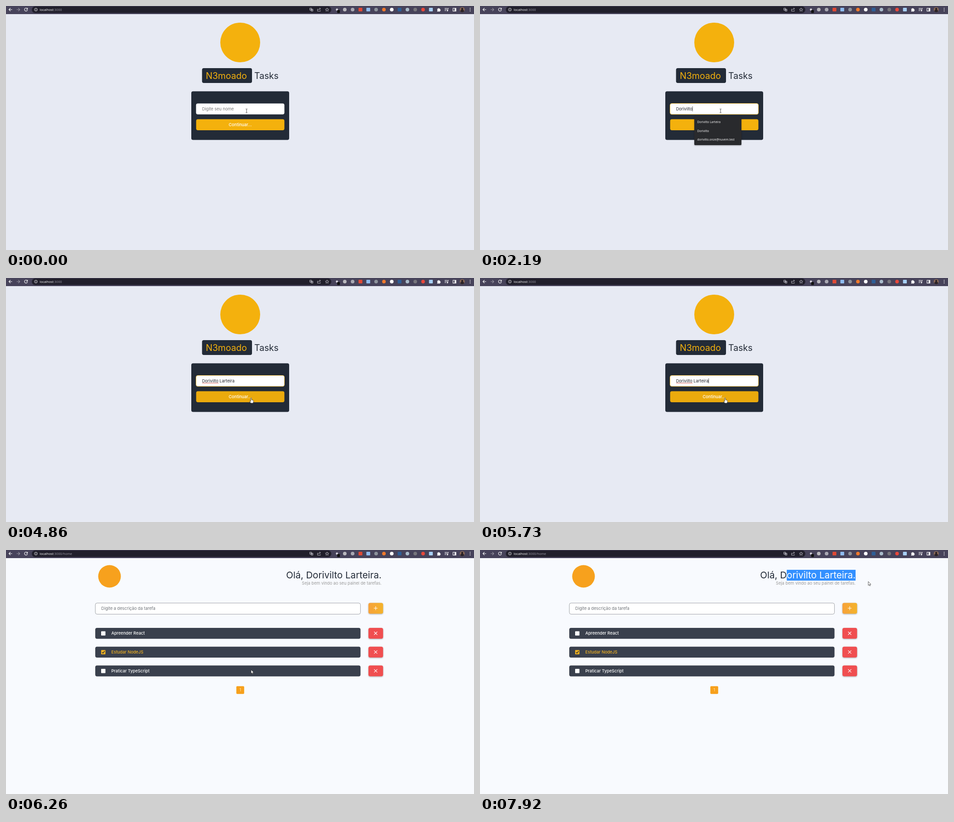
An HTML page that plays this animation: 1033x542 px, repeating every 7.99 s.

```html
<!DOCTYPE html>
<html lang="pt-BR">
<head>
<meta charset="utf-8">
<title>Tasks</title>
<style>
  html, body { margin: 0; width: 100%; height: 100%; overflow: hidden; background: #e7eaf3; }
  svg { display: block; width: 100vw; height: 100vh; }
  text { font: 9.2px Inter, sans-serif; white-space: pre; }
  .title { font-size: 19.6px; }
  .hello { font-size: 20.6px; text-anchor: end; }
  .medium { font-weight: 500; }
  .ui { font: 6.6px "Open Sans", sans-serif; fill: #fff; }
  .url { font-size: 7.3px; }
  .line { fill: none; stroke: #fff; stroke-width: 1.1; }
  .raised { filter: drop-shadow(0 1px 1.5px #0005); }
</style>
</head>
<body>
<svg viewBox="0 0 1033 542">
  <defs>
    <linearGradient id="amber"><stop stop-color="#f7a23a"/><stop offset="1" stop-color="#f4b32b"/></linearGradient>
    <clipPath id="selected"><rect id="clip" y="44" height="24"/></clipPath>
  </defs>

  <g id="login">
    <rect width="1033" height="542" fill="#e7eaf3"/>
    <circle cx="517" cy="81" r="44" fill="#f4b10d"/>
    <rect x="432.7" y="138" width="110.3" height="33" rx="4" fill="#232b37"/>
    <text class="title" x="441" y="161.5" fill="#f4b10d">N3moado</text>
    <text class="title" x="548" y="161.5" fill="#232b37">Tasks</text>
    <rect x="409" y="189.5" width="216" height="108" rx="4" fill="#232b37"/>
    <rect id="field" x="419.5" y="216.5" width="195" height="24.2" rx="4" fill="#fff"/>
    <text id="hint" x="432.7" y="231.8" fill="#777">Digite seu nome</text>
    <text id="typed" x="432.7" y="231.8" fill="#20242c"></text>
    <line id="spell" x1="433" y1="233.5" y2="233.5" stroke="#d9483f" stroke-width=".8"/>
    <line id="caret" y1="223" y2="234" stroke="#222" stroke-width=".8"/>
    <rect id="button" x="419.7" y="251.5" width="194.8" height="24.5" rx="4"/>
    <text class="medium" x="517" y="266.8" fill="#fff" text-anchor="middle">Continuar...</text>
    <g id="popup" class="raised">
      <rect id="panel" x="473" y="246" rx="2" fill="#292a2d"/>
      <g id="options"></g>
    </g>
  </g>

  <g id="home">
    <rect width="1033" height="542" fill="#f8fafe"/>
    <text id="hello" class="hello" x="829" y="63" fill="#232b37"></text>
    <rect id="mark" y="44" height="24" fill="#3390ff"/>
    <text id="helloOn" class="hello" x="829" y="63" fill="#fff" clip-path="url(#selected)"></text>
    <text x="829" y="77.3" fill="#999" text-anchor="end">Seja bem vindo ao seu painel de tarefas.</text>
    <rect x="197.2" y="117.8" width="585.2" height="24.8" rx="4" fill="#fff" stroke="#868990" stroke-width=".8"/>
    <text x="210.3" y="133.2" fill="#6f7378">Digite a descrição da tarefa</text>
    <rect class="raised" x="800" y="117.5" width="32.3" height="24" rx="4" fill="url(#amber)"/>
    <path class="line" d="M811.8 129.3h8.4M816 125.1v8.4"/>
    <circle id="logo" cx="228.5" cy="58.5" r="25" fill="#f7a11d"/>
    <g id="tasks"></g>
    <g id="pager">
      <rect x="508.4" y="177.6" width="17.3" height="17.2" rx="2" fill="#f7a01b"/>
      <text x="517" y="189.4" fill="#ffe3b4" text-anchor="middle">1</text>
    </g>
  </g>

  <g id="browser">
    <rect width="1033" height="18" fill="#47435a"/>
    <rect x="57" y="1" width="661" height="14.5" rx="7.2" fill="#211f2b"/>
    <path class="line" d="M13.5 8h-7M9.8 4.7L6.5 8l3.3 3.3"/>
    <path class="line" stroke-opacity=".45" d="M23.5 8h7M27.2 4.7L30.5 8l-3.3 3.3"/>
    <path class="line" d="M46.6 5.6A3.4 3.4 0 1 0 47.4 9M47.5 4.3v2.8h-2.8"/>
    <circle class="line" cx="66" cy="8" r="3.2" style="stroke-width:.8"/>
    <path class="line" style="stroke-width:.8" d="M66 7.5v2.2M66 6v.8"/>
    <text class="ui url" x="74.3" y="10.6">localhost<tspan id="path" fill="#9a98a3"></tspan></text>
    <g class="line" style="stroke:#d5d3dc;stroke-width:.8">
      <path d="M670.5 4.8h4v4.5h-4zM673.5 7h4v4.5h-4zM671.5 7h2M674.8 10l.8-2 .8 2"/>
      <path d="M689 7h-1.5v4.5h6.5v-2M689.5 9q.4-3 4-3M692 4l2.5 2-2.5 2"/>
      <path d="M708.7 4.4l1.1 2.5 2.7.2-2 1.8.6 2.7-2.4-1.4-2.4 1.4.6-2.7-2-1.8 2.7-.2z"/>
    </g>
    <g id="addons"></g>
    <path d="M951.8 6h2a1.3 1.3 0 0 1 2.6 0h1.8v2a1.3 1.3 0 0 1 0 2.6v1.6h-6.4v-2a1.3 1.3 0 0 0 0-2.4z" fill="#fff"/>
    <path class="line" d="M968.3 5.3h5.5M968.3 7.8h5.5M968.3 10.3h3M975.2 10.5V5.3h2"/>
    <circle cx="974.3" cy="10.4" r="1.3" fill="#fff"/>
    <path class="line" d="M986.6 5h6.6v6.4h-6.6z"/>
    <path d="M990.2 5h3v6.4h-3z" fill="#fff"/>
    <circle cx="1007" cy="8" r="5.6" fill="#8a6a58"/>
    <path d="M1003 12a4 4 0 0 1 8 0a5.6 5.6 0 0 1-8 0" fill="#2a2226"/>
    <circle cx="1007" cy="6.3" r="2.2" fill="#2a2226"/>
    <path d="M1024.5 4.2v1.5M1024.5 7.3v1.5M1024.5 10.4v1.5" stroke="#fff" stroke-width="1.5"/>
  </g>

  <g id="mouse">
    <circle id="press" r="6" fill="#f3e92a" fill-opacity=".9"/>
    <path id="beam" d="M-2-4.2h1.4L0-3.6.6-4.2H2M0-3.6v7.2M-2 4.2h1.4L0 3.6.6 4.2H2" fill="none" stroke="#222" stroke-width=".8"/>
    <path id="arrow" d="M0 0v8.6l2-1.8 1.3 3 1.3-.6-1.3-2.9h2.6z" fill="#fff" stroke="#222" stroke-width=".7"/>
    <path id="hand" d="M-.9 1.3a.9.9 0 0 1 1.9 0v3.4l3.4.8q1.2.4 1.1 1.6l-.5 2.8-.7 2.1H-.6L-2.9 8.8q-.9-1.4.3-1.5L-.9 8.4z" fill="#fff" stroke="#222" stroke-width=".7"/>
  </g>
</svg>

<script>
const LOOP = 7990, STEP = 69;
const FOCUS = 70, CLICK = 5600, HOME = 5790, LOADED = 5930, DRAG = 7160;
const NAME = "Dorivilto Larteira", FIRST = 9;
const KEYS = [1070, 1270, 1470, 1590, 1710, 1830, 1950, 2070, 2190,
              2460, 2990, 3250, 3450, 3580, 3710, 3840, 4100, 4240];
const SAVED = [NAME, "Dorivilto", "dorivilto.onze@nuvem.test", "Dono", "Teste", "Tarefas"];
const PRESSES = [[FOCUS, 200], [CLICK, 5670], [DRAG, 7780]];
// start, end, from x, from y, to x, to y
const MOVES = [
  [4450, 4795, 531, 233, 541, 266],
  [6260, 6743, 541, 266, 678, 62],
  [6743, 6950, 678, 62, 664.5, 55.5],
  [DRAG, 7919, 664.5, 55.5, 857, 70],
];
const DISCS = ["#d5d3dc", "#b9b8bd", "#a9a8b2", "", "", "#8d939b", "#ef7a2d", "#fff", "", "#a9bccb", "#77767c", "#e8493c"];
const TILES = { 3: "#e04a35", 4: "#8fbcf0", 8: "#2f5f96", 12: "#a8d0f5" };

const $ = id => document.getElementById(id);
const show = (id, on) => $(id).style.display = on ? "" : "none";
const set = (id, attrs) => {
  for (const key in attrs) $(id).setAttribute(key, attrs[key]);
};
const smooth = u => u * u * (3 - 2 * u);

$("hello").textContent = $("helloOn").textContent = `Olá, ${NAME}.`;

$("tasks").innerHTML = ["Apreender React", "Estudar NodeJS", "Praticar TypeScript"].map((label, i) => {
  const done = i === 1;
  return `<g transform="translate(0 ${173 + i * 41.7})">
    <rect x="197" width="585.5" height="24.3" rx="4" fill="#3a404d"/>
    <rect x="210" y="7.5" width="9.5" height="9.5" rx="1" fill="${done ? "#f4b321" : "#fff"}"/>
    ${done ? '<path d="M212 12.2l2 2.2 3.8-4.6" fill="none" stroke="#262b35" stroke-width="1.4"/>' : ""}
    <text class="medium" x="232.4" y="15.3" fill="${done ? "#f4b321" : "#fff"}">${label}</text>
    <rect class="raised" x="800" width="32.3" height="24" rx="4" fill="#f04e50"/>
    <path class="line" d="M812.5 8.5l7 7M819.5 8.5l-7 7"/></g>`;
}).join("");

const addonX = i => 730.5 + i * 17.28;
$("addons").innerHTML =
  DISCS.map((color, i) => color && `<circle cx="${addonX(i)}" cy="8" r="${i ? 4 : 2.4}" fill="${color}"/>`).join("") +
  Object.entries(TILES).map(([i, color]) =>
    `<rect x="${addonX(i) - 4.2}" y="4" width="8.4" height="8" rx="1" fill="${color}"/>`).join("") +
  '<rect x="731" y="9" width="6" height="6.5" rx="1" fill="#111"/>';

function mouseAt(t) {
  let x = 531, y = 233;
  for (const [start, end, x0, y0, x1, y1] of MOVES) {
    if (t < start) break;
    const elapsed = Math.floor((t - start) / STEP + 0.01) * STEP;
    const u = smooth(Math.min(1, elapsed / (end - start)));
    x = x0 + (x1 - x0) * u;
    y = y0 + (y1 - y0) * u;
  }
  return { x, y };
}

function drawLogin(t, mouse) {
  const count = KEYS.filter(k => k <= t).length;
  const typed = NAME.slice(0, count);
  const focused = t >= FOCUS;
  $("typed").textContent = typed;
  show("hint", !count);
  set("field", { stroke: focused ? "#f6c342" : "none" });
  set("button", { fill: mouse.y > 251 ? "#ebaa0d" : "#f4b10d" });

  const width = count ? $("typed").getComputedTextLength() : 0;
  const lastKey = count ? KEYS[count - 1] : 120;
  show("caret", focused && (t < lastKey || (t - lastKey) % 1060 < 530));
  set("caret", { x1: 433 + width, x2: 433 + width });
  show("spell", count > FIRST);
  if (count > FIRST) set("spell", { x2: 433 + $("typed").getSubStringLength(0, FIRST) });

  const matches = SAVED.filter(s => s.toLowerCase().startsWith(typed.toLowerCase()));
  const open = t >= 130 && typed !== NAME;
  show("popup", open);
  if (!open) return;
  $("popup").style.opacity = Math.min(1, (t - 60) / 200);
  set("panel", { width: matches.length > 1 ? 104 : 71.5, height: 4.5 + matches.length * 19.5 });
  $("options").innerHTML = matches.map((s, i) =>
    `<text class="ui" x="479.5" y="${260.4 + i * 19.5}">${s}</text>`).join("");
}

function drawHome(t, mouse) {
  const loaded = t >= LOADED;
  show("logo", loaded);
  show("tasks", loaded);
  set("pager", { transform: `translate(0 ${loaded ? 125 : 0})` });

  // The selection grows letter by letter from after the initial.
  const hello = $("hello"), from = 6;
  const left = hello.getStartPositionOfChar(from).x;
  let right = left;
  if (t >= DRAG) {
    for (let i = from; i < hello.getNumberOfChars(); i++) {
      const start = hello.getStartPositionOfChar(i).x, end = hello.getEndPositionOfChar(i).x;
      if (mouse.x > (start + end) / 2) right = end;
    }
  }
  for (const id of ["mark", "clip"]) set(id, { x: left, width: right - left });
}

function drawMouse(t, { x, y }, home) {
  const overText = home ? x > 615 && x < 829 && y > 45 && y < 69 : y < 241;
  const overButton = !home && y > 251;
  show("beam", overText);
  show("hand", overButton);
  show("arrow", !overText && !overButton);
  show("press", PRESSES.some(([start, end]) => t >= start && t < end));
  set("mouse", { transform: `translate(${x} ${y})` });
}

function draw(now) {
  const t = now % LOOP, home = t >= HOME, mouse = mouseAt(t);
  show("login", !home);
  show("home", home);
  $("path").textContent = t >= LOADED ? ":3000/home" : ":3000";
  if (home) drawHome(t, mouse);
  else drawLogin(t, mouse);
  drawMouse(t, mouse, home);
}

const begin = performance.now();
function tick() {
  draw(performance.now() - begin);
  requestAnimationFrame(tick);
}
tick();
</script>
</body>
</html>
```
